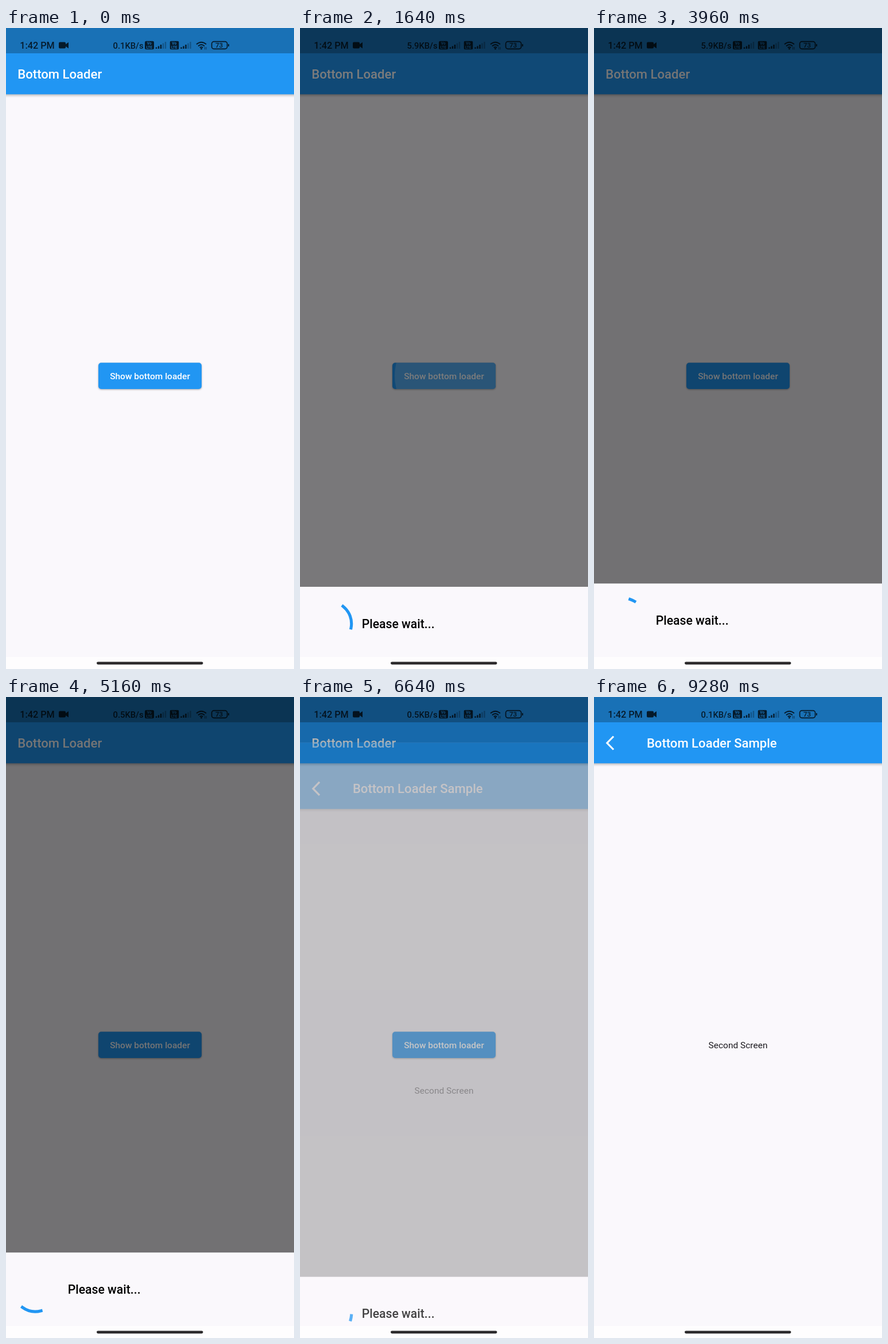
An HTML page for the animation above (9320 ms loop, 502 px wide and 1115 px high).

```html
<!DOCTYPE html>
<html lang="en">
<head>
<meta charset="utf-8">
<title>Bottom Loader</title>
<style>
  html, body { margin: 0; width: 100%; height: 100%; overflow: hidden; background: #fefdfe; }
  svg { display: block; width: 100%; height: 100%; font-family: Roboto, sans-serif; }
  .title { font-size: 22.1px; font-weight: 500; fill: #fff; }
  .label { font-size: 15.5px; text-anchor: middle; }
  .bar { fill: #2196f3; filter: drop-shadow(0 2px 2px rgba(0, 0, 0, .28)); }
  .paper { fill: #faf8fc; }
</style>
</head>
<body>
<svg viewBox="0 0 502 1115">
  <defs>
    <clipPath id="buttonClip"><rect x="161" y="582.3" width="180" height="45.7" rx="5"/></clipPath>
    <mask id="badgeMask">
      <rect width="16" height="15" rx="3" fill="#fff"/>
      <g font-size="6.5" font-weight="700" text-anchor="middle">
        <text x="7.7" y="6.8">Vo</text><text x="7.7" y="13">LTE</text>
      </g>
    </mask>
    <g id="signal">
      <rect width="16" height="15" mask="url(#badgeMask)"/>
      <path d="M20 13.5v-2.5M24 13.5v-4.5M28 13.5v-7" stroke="#000" stroke-width="2.4"/>
      <path d="M32 13.5v-9.5M36 13.5v-12" stroke="#000" stroke-width="2.4" opacity=".32"/>
    </g>
  </defs>

  <g id="home">
    <rect class="paper" width="502" height="1094"/>
    <rect class="bar" x="-6" y="-6" width="514" height="121.3"/>
    <text class="title" x="20.3" y="88">Bottom Loader</text>
    <rect id="button" x="161" y="582.3" width="180" height="45.7" rx="5" fill="#2196f3"/>
    <g clip-path="url(#buttonClip)"><circle id="ripple" cy="605" fill="#fff"/></g>
    <text class="label" x="251" y="610.5" font-weight="500" fill="#fff">Show bottom loader</text>
  </g>

  <rect id="barrier" width="502" height="1094"/>

  <g id="sheet">
    <rect class="paper" y="966.3" width="502" height="160"/>
    <path id="spinner" fill="none" stroke="#2196f3" stroke-width="5.1" stroke-linecap="square"/>
    <text x="107.7" y="1038" font-size="21.2" font-weight="500">Please wait...</text>
  </g>

  <g id="second">
    <rect class="paper" width="502" height="1094"/>
    <rect class="bar" x="-6" width="514" height="115.3"/>
    <path d="M34 68.5L22.8 80L34 91.5" fill="none" stroke="#fff" stroke-width="3.2"/>
    <text class="title" x="91.9" y="88">Bottom Loader Sample</text>
    <text class="label" x="251" y="610.5" fill="#1d1b20">Second Screen</text>
  </g>

  <rect width="502" height="44" opacity=".25"/>
  <g opacity=".76">
    <g font-weight="500">
      <text x="24.3" y="36" font-size="16.2">1:42 PM</text>
      <text id="speed" x="186.5" y="35.5" font-size="14.8"></text>
      <text x="371.5" y="34.3" font-size="11.5" text-anchor="middle">73</text>
    </g>
    <path d="M94 24.5h8q2 0 2 2v1.7l5-3.4v10.6l-5-3.4v1.5q0 2-2 2h-8q-2 0-2-2v-7q0-2 2-2z"/>
    <use href="#signal" x="242" y="22.5"/>
    <use href="#signal" x="285.5" y="22.5"/>
    <g fill="none" stroke="#000" stroke-width="1.9">
      <path d="M332 28.3q8.5-7.2 17 0M335 31.4q5.5-4.6 11 0M337.8 34.3q2.7-2.2 5.4 0"/>
      <path d="M346.6 33v4.5M349 33v4.5" stroke-width="1" opacity=".7"/>
      <rect x="358.6" y="23.7" width="27" height="12.6" rx="3.8" stroke-width="1.7"/>
      <path d="M388 28v4" stroke-width="1.8"/>
    </g>
    <circle cx="340.5" cy="36.2" r="1.4"/>
  </g>

  <rect y="1094" width="502" height="21" fill="#fefdfe"/>
  <rect x="158" y="1102.4" width="185.5" height="4.8" rx="2.4" fill="#2c2a2c"/>
</svg>

<script>
const LOOP = 9320;
const PRESS = 1450, OPEN = 1493, SPIN = 1475, LEAVE = 6505;
const SHEET_HEIGHT = 128;

const el = id => document.getElementById(id);
const [button, ripple, barrier, sheet, spinner, second, speed] =
  ['button', 'ripple', 'barrier', 'sheet', 'spinner', 'second', 'speed'].map(el);

const progress = (t, start, duration) => Math.min(1, Math.max(0, (t - start) / duration));
const mix = (a, b, k) => a + (b - a) * k;

function cubic(x1, y1, x2, y2) {
  const at = (a, b, s) => 3 * (1 - s) * (1 - s) * s * a + 3 * (1 - s) * s * s * b + s ** 3;
  return x => {
    if (x <= 0 || x >= 1) return x <= 0 ? 0 : 1;
    let low = 0, high = 1;
    for (let i = 0; i < 24; i++) {
      const mid = (low + high) / 2;
      if (at(x1, x2, mid) < x) low = mid; else high = mid;
    }
    return at(y1, y2, low);
  };
}
const ease = cubic(.25, .1, .25, 1);
const easeIn = cubic(.42, 0, 1, 1);
const decelerate = cubic(0, 0, .2, 1);
const fastOutSlowIn = cubic(.4, 0, .2, 1);

function drawButton(t) {
  const lift = progress(t, PRESS - 30, 80) - progress(t, 1540, 100);
  button.style.filter =
    `drop-shadow(0 ${mix(1.8, 4, lift)}px ${mix(1.5, 3.2, lift)}px rgba(0,0,0,${mix(.33, .38, lift)}))`;
  const grow = ease(progress(t, PRESS + 5, 270));
  ripple.setAttribute('cx', mix(295, 251, grow));
  ripple.setAttribute('r', mix(28, 93, grow));
  ripple.setAttribute('opacity', .24 * (progress(t, PRESS, 60) - progress(t, 1705, 150)));
}

// Material indeterminate spinner: head and tail chase each other while the whole arc turns.
function drawSpinner(t) {
  const time = Math.max(0, t - SPIN);
  const phase = time / 1333 % 1;
  const head = 270 * fastOutSlowIn(progress(phase, 0, .5));
  const tail = 270 * fastOutSlowIn(progress(phase, .5, .5));
  const start = tail + 360 * time / 2222 + 90 * phase;
  const sweep = Math.max(head - tail, .1);
  const point = degrees => {
    const angle = (degrees - 90) * Math.PI / 180;
    return `${51.2 + 38.5 * Math.cos(angle)} ${1030.5 + 38.5 * Math.sin(angle)}`;
  };
  spinner.setAttribute('d', `M${point(start)}A38.5 38.5 0 ${+(sweep > 180)} 1 ${point(start + sweep)}`);
}

function drawSheet(t) {
  const shown = t < LEAVE ? progress(t, OPEN, 205) : 1 - progress(t, LEAVE, 200);
  barrier.setAttribute('opacity', .54 * ease(shown));
  sheet.setAttribute('transform', `translate(0 ${SHEET_HEIGHT * (1 - decelerate(shown))})`);
  sheet.setAttribute('visibility', shown > 0 ? 'visible' : 'hidden');
  drawSpinner(t);
}

function drawSecond(t) {
  const entered = progress(t, LEAVE, 300);
  second.setAttribute('opacity', easeIn(entered));
  second.setAttribute('transform', `translate(0 ${273.5 * (1 - fastOutSlowIn(entered))})`);
}

function render(t) {
  const rate = t < 960 || t >= 8700 ? '0.1' : t < 4960 ? '5.9' : '0.5';
  speed.textContent = rate + 'KB/s';
  drawButton(t);
  drawSheet(t);
  drawSecond(t);
}

const began = performance.now();
function tick() {
  render((performance.now() - began) % LOOP);
  requestAnimationFrame(tick);
}
tick();
</script>
</body>
</html>
```
